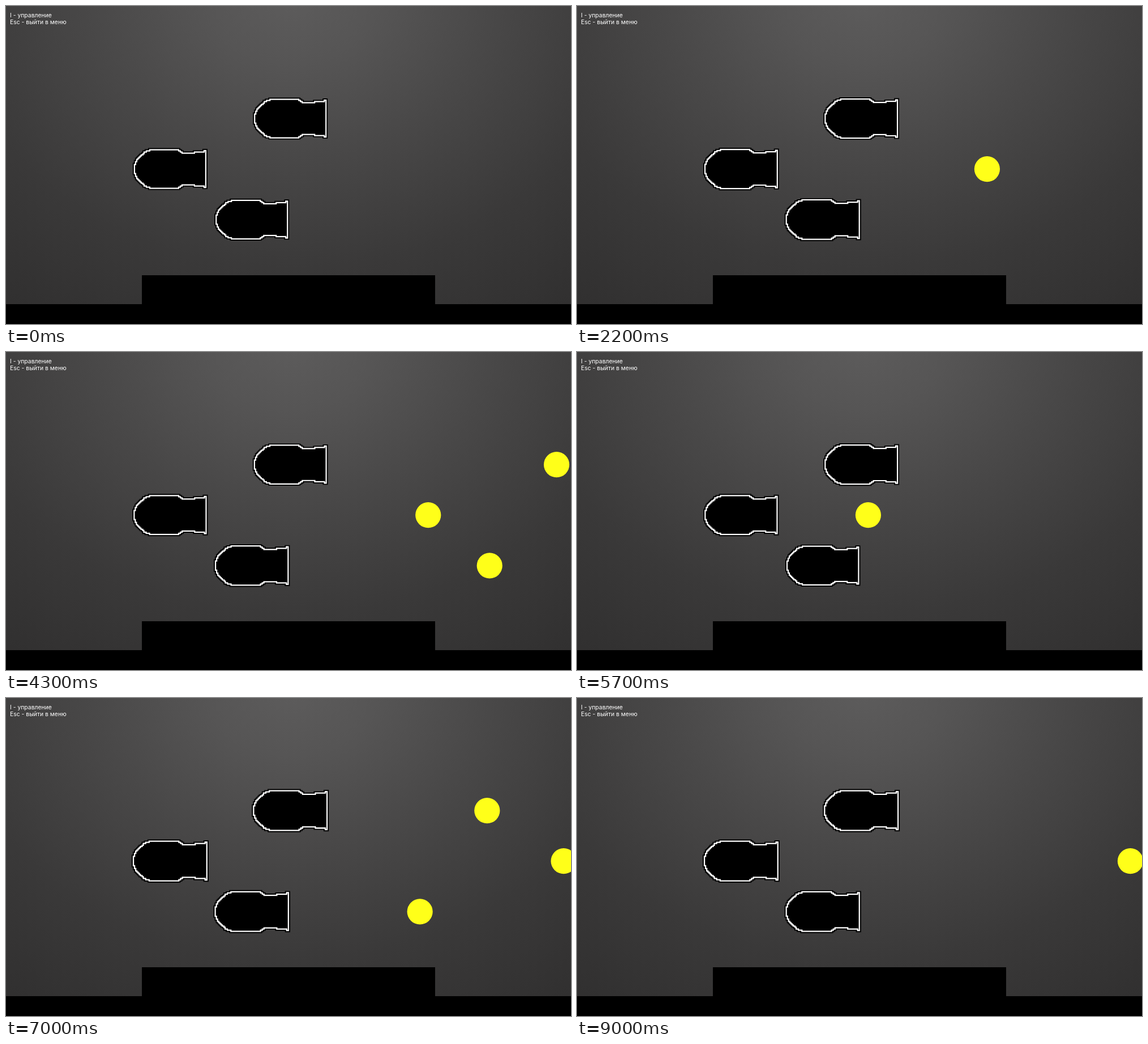
Write an HTML page that moves like this. It is 998 by 561 pixels and loops after 9100 ms.

```html
<!DOCTYPE html>
<html lang="ru">
<head>
<meta charset="utf-8">
<style>
  html, body { margin: 0; width: 100%; height: 100%; overflow: hidden; background: #000; }
  svg { display: block; width: 998px; height: 561px; }
  text { font: 10.4px Inter, "Open Sans", sans-serif; fill: #fff; }
</style>
</head>
<body>
<svg viewBox="0 0 998 561">
  <defs>
    <radialGradient id="light" gradientUnits="userSpaceOnUse" cx="0" cy="0" r="1"
      gradientTransform="translate(505 -20) scale(840 672)">
      <stop offset="0" stop-color="#5d5c5c"/>
      <stop offset=".18" stop-color="#565555"/>
      <stop offset=".42" stop-color="#494848"/>
      <stop offset=".72" stop-color="#3a3939"/>
      <stop offset="1" stop-color="#313030"/>
    </radialGradient>
    <g id="cannon" stroke-linejoin="miter">
      <path class="body" stroke="#000" stroke-width="6"/>
      <path class="body" stroke="#fff" stroke-width="2.2"/>
    </g>
  </defs>
  <rect width="998" height="561" fill="url(#light)"/>
  <g id="balls" fill="#ffff19"></g>
  <g id="cannons"></g>
  <path d="M0 526H240V475H758V526H998V561H0Z"/>
  <text x="7" y="19.7">I - управление</text>
  <text x="7" y="32.3">Esc - выйти в меню</text>
</svg>
<script>
const LOOP = 9100, STEP = 100;
const SPEED = 362;      // px per second
const MUZZLE = 20;      // launch point, right of the cannon centre
const KICK = 0.38, BREATH = 1.01;

// Shot times in seconds
const cannons = [
  { x: 502.2, y: 198.6, shots: [0.036, 3.056, 6.095] },
  { x: 289.9, y: 287.6, shots: [1.055, 3.096, 5.135, 7.156] },
  { x: 434.2, y: 376.8, shots: [0.156, 3.195, 6.235] }
];

// Upper half of the silhouette: [x, half height] at each stair
const stairs = [
  [-63, 8], [-61, 13], [-59, 17], [-57, 19], [-55, 21], [-53, 23], [-51, 25],
  [-48, 27], [-46, 30], [-42, 32], [-36, 34], [15, 32], [18, 30], [21, 28],
  [43, 30], [60, 32.5]
];

function outline() {
  const top = [];
  let last = 0;
  for (const [x, h] of stairs) {
    if (last) top.push([x, -last]);
    top.push([x, -h]);
    last = h;
  }
  top.push([63, -last]);
  const bottom = top.map(([x, y]) => [x, -y]).reverse();
  return "M" + top.concat(bottom).join("L") + "Z";
}

function add(parent, tag, attrs) {
  const el = document.createElementNS("http://www.w3.org/2000/svg", tag);
  for (const key in attrs) el.setAttribute(key, attrs[key]);
  return document.getElementById(parent).appendChild(el);
}

document.querySelectorAll(".body").forEach(p => p.setAttribute("d", outline()));
for (const c of cannons) {
  c.el = add("cannons", "use", { href: "#cannon" });
  c.balls = c.shots.map(() => add("balls", "circle", { r: 22.6, cy: c.y + 0.1 }));
}

function scaleAt(c, t) {
  const shot = c.shots.filter(s => s <= t).pop();
  const since = shot === undefined ? t + KICK : t - shot;
  if (since < KICK) return 1 + 0.16 * Math.sin(Math.PI * since / KICK);
  return 1 + 0.015 * (1 - Math.cos(2 * Math.PI * (since - KICK) / BREATH));
}

function draw(ms) {
  const t = Math.floor((ms % LOOP) / STEP) * STEP / 1000;
  for (const c of cannons) {
    c.el.setAttribute("transform", `translate(${c.x} ${c.y}) scale(${scaleAt(c, t)})`);
    c.balls.forEach((ball, i) => {
      const age = t - c.shots[i];
      ball.setAttribute("cx", c.x + MUZZLE + SPEED * age);
      ball.setAttribute("visibility", age >= 0 ? "visible" : "hidden");
    });
  }
}

let start;
function tick(now) {
  start ??= now;
  draw(now - start);
  requestAnimationFrame(tick);
}
draw(0);
requestAnimationFrame(tick);
</script>
</body>
</html>
```
